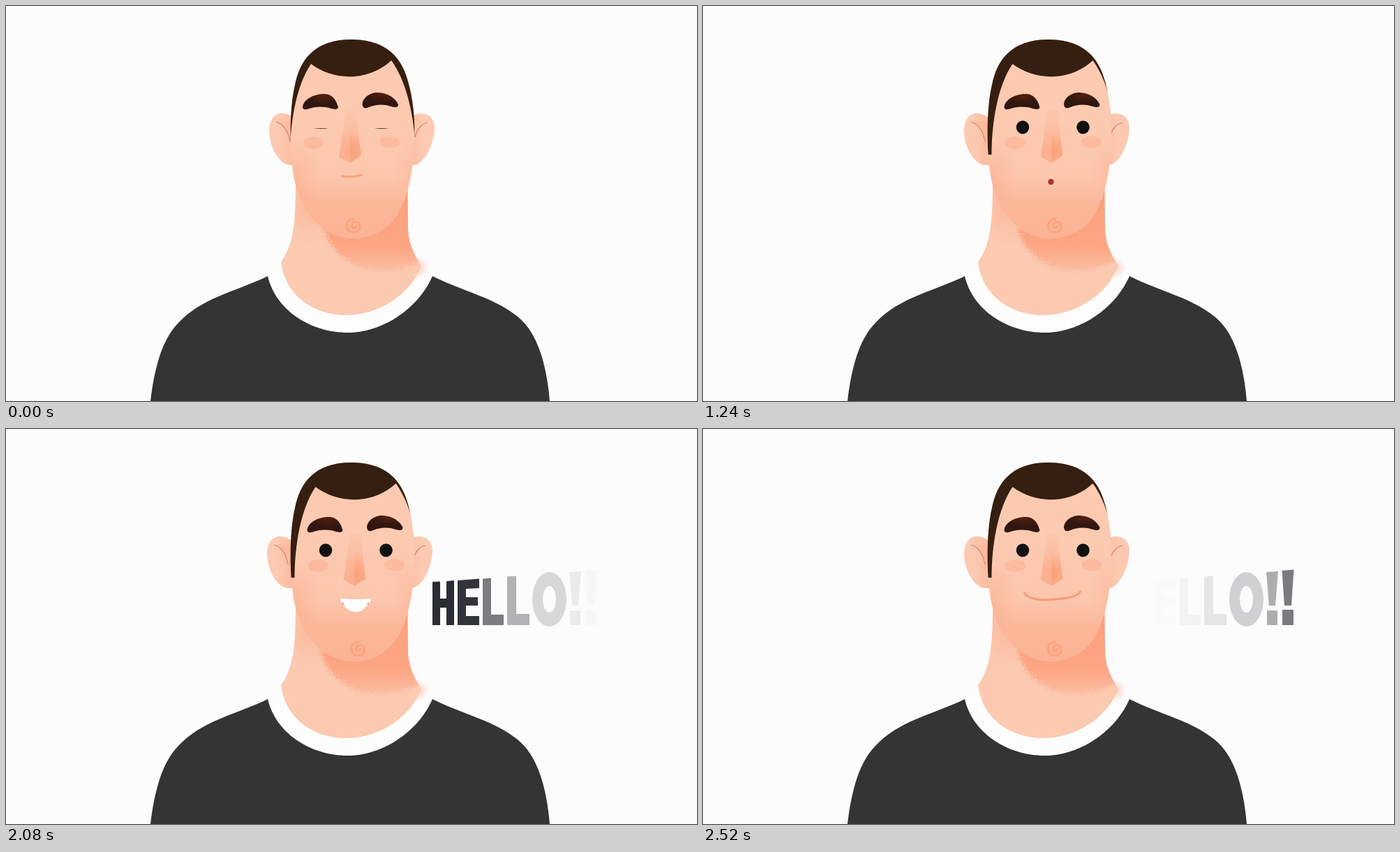
Recreate the animation shown at these times as an HTML page. Size 990x566 px, loop 2560 ms.

```html
<!DOCTYPE html>
<html lang="en">
<head>
<meta charset="utf-8">
<title>Hello</title>
<style>
  html, body { margin: 0; width: 100%; height: 100%; overflow: hidden; background: #fcfcfc; }
  svg { display: block; width: 100%; height: 100%; }
</style>
</head>
<body>
<svg viewBox="0 0 990 566" role="img" aria-label="HELLO!!">
  <defs>
    <path id="headShape" d="M495 48C549 48 568 78 576 108C585 140 586 170 585 200C584 225 579 258 569 282C558 313 532 333 498 333C457 333 424 300 414 252C406 220 405 150 414 113C421 78 441 48 495 48Z"/>
    <path id="neckShape" d="M410 225L415 255C415 310 412 342 394 367C400 415 440 443 488 443C533 443 580 414 595 372C582 353 576 335 576 318L575 230Z"/>
    <clipPath id="headClip"><use href="#headShape"/></clipPath>
    <clipPath id="neckClip"><use href="#neckShape"/></clipPath>
    <clipPath id="mouthClip"><path d="M476 248H526C521 263 512 270.500 500 270.500C488 270.500 480 262 476 248Z"/></clipPath>
    <linearGradient id="skin" gradientUnits="userSpaceOnUse" x1="0" y1="170" x2="0" y2="333">
      <stop offset="0" stop-color="#fccab1"/><stop offset=".45" stop-color="#fcc7ad"/>
      <stop offset=".72" stop-color="#fcb698"/><stop offset="1" stop-color="#fcb495"/>
    </linearGradient>
    <linearGradient id="neckShade" gradientUnits="userSpaceOnUse" x1="0" y1="265" x2="0" y2="382">
      <stop offset="0" stop-color="#fca07b"/><stop offset=".7" stop-color="#fca685"/>
      <stop offset="1" stop-color="#fcb597" stop-opacity=".6"/>
    </linearGradient>
    <linearGradient id="noseFade" gradientUnits="userSpaceOnUse" x1="0" y1="148" x2="0" y2="222">
      <stop offset="0" stop-color="#fba581" stop-opacity=".1"/><stop offset="1" stop-color="#fba581" stop-opacity=".6"/>
    </linearGradient>
    <radialGradient id="noseDark" gradientUnits="userSpaceOnUse" cx="492" cy="207" r="30">
      <stop offset="0" stop-color="#fa9870" stop-opacity=".8"/><stop offset="1" stop-color="#fa9870" stop-opacity="0"/>
    </radialGradient>
    <radialGradient id="blush">
      <stop offset="0" stop-color="#fca27d" stop-opacity=".5"/><stop offset="1" stop-color="#fca27d" stop-opacity="0"/>
    </radialGradient>
    <linearGradient id="earLeftFill">
      <stop offset=".35" stop-color="#fccab2"/><stop offset="1" stop-color="#fcb99e"/>
    </linearGradient>
    <linearGradient id="earRightFill">
      <stop offset="0" stop-color="#fcbba0"/><stop offset=".6" stop-color="#fccab2"/>
    </linearGradient>
    <radialGradient id="brow" cx=".58" cy=".1" r=".55">
      <stop offset="0" stop-color="#54200f"/><stop offset="1" stop-color="#2f1710"/>
    </radialGradient>
    <filter id="grain" x="-10%" y="-10%" width="120%" height="120%">
      <feGaussianBlur stdDeviation="2" result="soft"/>
      <feTurbulence type="fractalNoise" baseFrequency=".5" numOctaves="2" seed="4"/>
      <feDisplacementMap in="soft" scale="20" xChannelSelector="R" yChannelSelector="G"/>
    </filter>
  </defs>

  <path fill="#343434" d="M207 566C213 515 225 476 247 454C282 417 328 410 375 387L490 420L611 387C655 409 700 418 733 445C763 469 775 518 779 566Z"/>
  <path fill="#fdfdfd" d="M375 387C386 435 435 468 490 468C538 468 590 435 611 387L595 372H394Z"/>
  <ellipse cx="590" cy="375" rx="16" ry="16" fill="url(#blush)"/>
  <use href="#neckShape" fill="#fbcab1"/>
  <g clip-path="url(#neckClip)">
    <ellipse cx="436" cy="285" rx="42" ry="58" fill="url(#blush)" opacity=".8"/>
    <g id="shadow">
      <path filter="url(#grain)" fill="url(#neckShade)" d="M455 316C463 350 495 379 535 379C560 379 582 372 602 362L602 245L500 290Z"/>
    </g>
  </g>

  <g id="ears">
    <path fill="url(#earLeftFill)" d="M416 164C402 148 377 149 377 180C378 205 393 229 409 228H416Z"/>
    <path fill="#fcb497" opacity=".5" d="M387 166C397 169 405 180 407 200L412 190V165Z"/>
    <path fill="none" stroke="#d08363" stroke-width="1.200" d="M387 166C397 169 404 178 407 194"/>
    <path fill="url(#earRightFill)" d="M576 160C598 147 614 156 614 175C613 200 598 229 583 228H576Z"/>
    <path fill="none" stroke="#d08363" stroke-width="1.200" d="M604 167C596 168 588 177 586 188"/>
  </g>

  <use href="#headShape" fill="url(#skin)"/>
  <g clip-path="url(#headClip)">
    <ellipse cx="411" cy="248" rx="42" ry="58" fill="url(#blush)" opacity=".8"/>
    <ellipse cx="586" cy="238" rx="32" ry="55" fill="url(#blush)" opacity=".5"/>
    <path id="hair" fill="#351f10" d="M390 213H407C407 170 415 115 437 83C470 108 520 108 552 78C572 105 583 150 586 192H610V30H390Z"/>
  </g>

  <g id="face">
    <path fill="url(#brow)" d="M425 145C426 134 440 126 457 126C470 127 474 138 476 145C475 149 470 148 466 147C455 143.500 443 144 433 147.500C428 149 425 148 425 145Z"/>
    <path fill="url(#brow)" d="M511 143C509 136 516 126 530 124C546 123 558 132 562 141C562 146 557 145.500 552 144C541 140 529 141 520 145C515 147 512 147 511 143Z"/>
    <g fill="#fca685" opacity=".42">
      <ellipse cx="440.500" cy="196" rx="14.500" ry="9"/>
      <ellipse cx="550" cy="195" rx="14.500" ry="8.500"/>
    </g>
    <path fill="url(#noseFade)" d="M487 150H501L509 214L493 225L477 216Z"/>
    <path fill="url(#noseDark)" d="M492 165H503L509 214L493 225Z"/>
    <path fill="url(#noseDark)" opacity=".35" d="M492 165H486L477 216L493 225Z"/>
    <ellipse class="eye" cx="451.500" rx="9.300" fill="#111"/>
    <ellipse class="eye" cx="538" rx="9.300" fill="#111"/>
    <path fill="none" stroke="#fb9d78" stroke-width="3.500" stroke-linecap="round" opacity=".65" d="M498 305C490 306 486 313 489 319C492 327 505 326 507 317C507 308 495 307 495 315C496 319 501 319 502 315"/>
    <path id="flat" fill="none" stroke="#f9a480" stroke-width="3.300" stroke-linecap="round" d="M481.500 244Q498 246 510 242"/>
  </g>

  <circle id="round" cx="498.500" cy="252" r="4.200" fill="#ab332d"/>
  <g id="open">
    <g clip-path="url(#mouthClip)">
      <path fill="#a5302b" d="M470 245H530V275H470Z"/>
      <ellipse cx="502" cy="271" rx="17" ry="8" fill="#e58f78"/>
    </g>
    <path fill="#fff" d="M478 243Q501 245 524 243Q527 243 526.500 247Q526 251 523 250.500Q501 252 479 250.500Q475 250 475 246Q475 243 478 243Z"/>
  </g>
  <g id="grin">
    <path fill="#b5483a" d="M481 247H521L519 251H482Z"/>
    <path fill="#fff" d="M481 243Q501 245 520 243Q523 243 522 247Q522 249.500 519 249.500H517L518.500 250.500C514 259 508 262 501 262C493 262 487 258 483 250.500L485 249.500H482Q479 249 479 246Q479 243 481 243Z"/>
  </g>
  <path id="smile" fill="none" stroke="#f99a75" stroke-width="3" stroke-linecap="round" d="M460.500 235C466 243 481 246 498 244.500C518 243 537 241 540.500 233"/>

  <g id="word" fill="#2c2c34" fill-rule="evenodd">
    <path d="M611 219L622 218.500V243H631V218L642 217V281H631V256H622V281H611Z"/>
    <path d="M647 217L678 214.500V228L659 229V241H676V253H659V268H678V281H647Z"/>
    <path d="M683 214.500L695 213.500V266H713V281H683Z"/>
    <path d="M718 211.500L731 210.500V265H750V281H718Z"/>
    <path d="M754 244A24.500 39 0 0 1 803 244A24.500 39 0 0 1 754 244ZM769 244A9.500 19 0 0 0 788 244A9.500 19 0 0 0 769 244Z"/>
    <path d="M807 205L824 204L820 253H811ZM808 260H823V281H808Z"/>
    <path d="M829.500 203L846.500 201.500L843 253H833ZM830 259H846V281H830Z"/>
  </g>
</svg>
<script>
const LOOP = 2560, STEP = 40;
const $ = id => document.getElementById(id);
const eyes = document.querySelectorAll('.eye');
const letters = [...$('word').children];
const clamp = v => Math.min(1, Math.max(0, v));
const easeInOut = u => u < .5 ? 4 * u ** 3 : 1 - 4 * (1 - u) ** 3;
const slide = (id, x) => $(id).setAttribute('transform', `translate(${x} 0)`);

// Each mouth shape holds from its start time until the next one
const mouths = [[0, 'flat'], [1200, 'round'], [1760, 'open'], [2040, 'grin'], [2280, 'round'], [2480, 'smile']];

function draw(t) {
  const turn = easeInOut(clamp((t - 880) / 240));
  slide('face', 6.5 * turn);
  slide('hair', 6.5 * turn);
  slide('ears', -3 * turn);
  slide('shadow', -5 * turn);

  const lid = clamp(t / 200);
  for (const eye of eyes) {
    eye.setAttribute('ry', Math.max(.4, 9.5 * lid));
    eye.setAttribute('cy', 175.7 - 1.9 * lid);
  }

  const current = mouths.filter(([start]) => start <= t).pop()[1];
  for (const [, id] of mouths) $(id).style.display = id === current ? '' : 'none';

  letters.forEach((letter, i) => {
    const fadeIn = clamp((t - 1823 - 32 * i) / 228);
    const fadeOut = clamp(1 - (t - 2164 - 50 * i) / 385);
    letter.style.opacity = (fadeIn * fadeOut) ** 3;
  });
}

function tick() {
  draw(Math.floor(performance.now() % LOOP / STEP) * STEP);
  requestAnimationFrame(tick);
}
tick();
</script>
</body>
</html>
```
